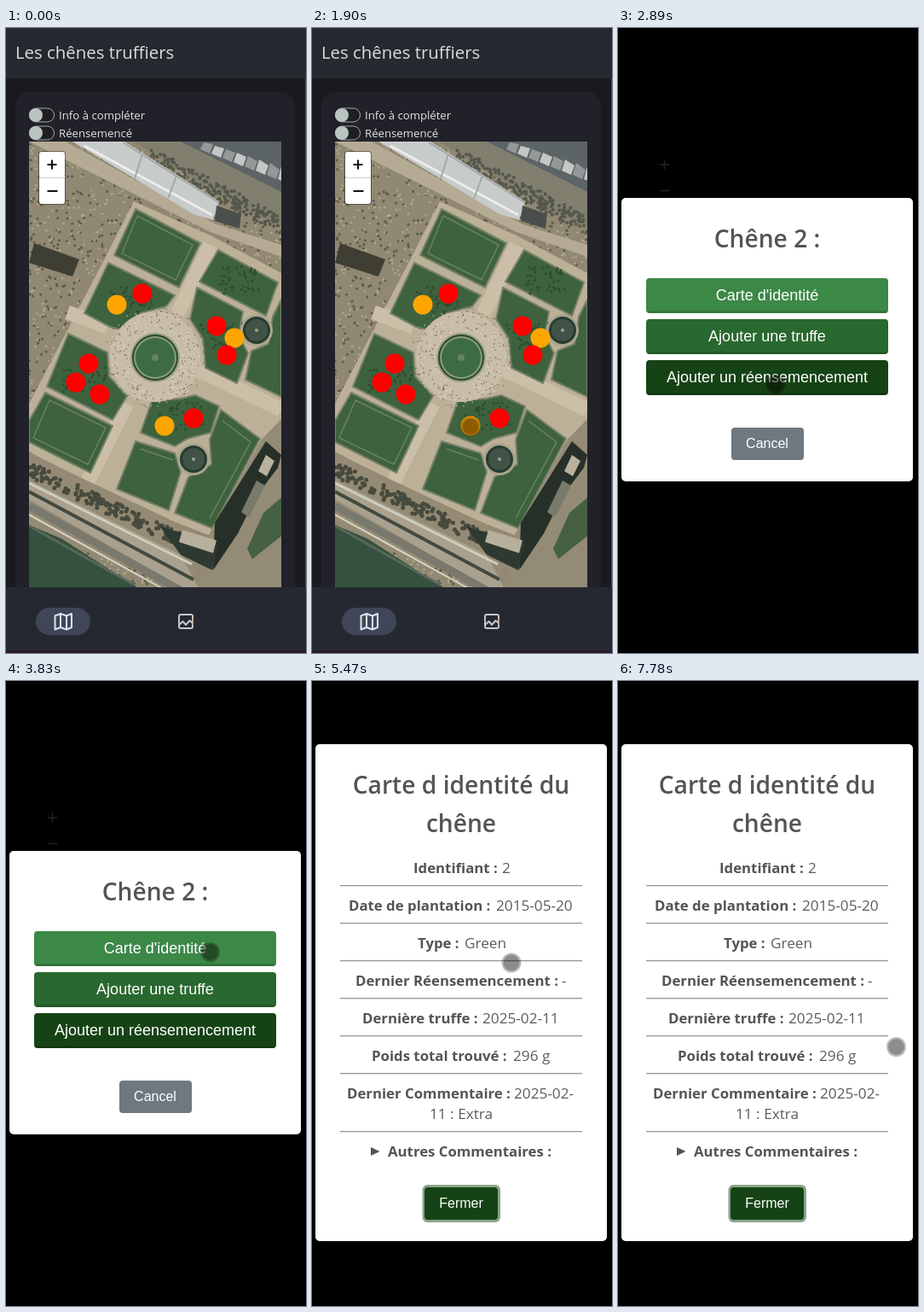
Animation of 352 by 732 pixels, one loop 8 s. Source, as an HTML page:

```html
<!DOCTYPE html>
<html lang="fr">
<head>
<meta charset="utf-8">
<title>Les chênes truffiers</title>
<style>
  html, body { margin: 0; width: 100%; height: 100%; overflow: hidden; background: #1a1a1e; }
  svg { display: block; width: 100vw; height: 100vh; }
  text { font-family: "Open Sans", "Noto Sans", sans-serif; }
  .label { font-size: 13.2px; fill: #e6e4e2; }
  .title { font-size: 28.2px; font-weight: 600; fill: #545454; text-anchor: middle; }
  .button { font: 18px "Liberation Sans", Arial, sans-serif; fill: #fff; text-anchor: middle; }
  .small { font-size: 16px; }
  .key { font-size: 16.8px; font-weight: 700; fill: #545454; }
  .value { font-size: 17.2px; fill: #5c5c5c; }
</style>
</head>
<body>
<svg viewBox="0 0 352 732">
  <defs>
    <clipPath id="mapClip"><rect x="27" y="133" width="296" height="522"/></clipPath>
    <filter id="soften"><feGaussianBlur stdDeviation=".5"/></filter>
  </defs>

  <rect width="352" height="732" fill="#1a1a1e"/>
  <rect width="352" height="59" fill="#272931"/>
  <text x="11" y="36" font-size="20.4" fill="#dadfdc">Les chênes truffiers</text>
  <rect x="11" y="75" width="328" height="620" rx="16" fill="#212129"/>
  <rect x="351" y="59" width="1" height="596" fill="#4a4c52"/>
  <g id="toggles"></g>

  <g clip-path="url(#mapClip)"><g id="map" filter="url(#soften)"></g></g>
  <g id="markers"></g>

  <rect x="38" y="144" width="32" height="63" rx="4" fill="#0006"/>
  <rect x="39" y="145" width="30" height="61" rx="3" fill="#fff"/>
  <path d="M39 175.5H69" stroke="#ccc"/>
  <path d="M48.5 160h11M54 154.5v11M48.5 191h12" stroke="#111" stroke-width="2"/>

  <rect y="655" width="352" height="77" fill="#262831"/>
  <rect y="729" width="352" height="3" fill="#2a1a2d"/>
  <rect x="35" y="679" width="64" height="32" rx="16" fill="#3f4658"/>
  <g fill="none" stroke-width="2" stroke-linejoin="round">
    <path d="M57.5 688.5L64 686 71 688.5 77 686V702L71 704.5 64 702 57.5 704.5ZM64 686V702M71 688.5V704.5" stroke="#dde1ee"/>
    <rect x="203" y="687" width="16" height="16" rx="2" stroke="#c3c8cc"/>
    <path d="M203 699L207.5 695 211 699 215.5 694 219 697" stroke="#c3c8cc"/>
    <path d="M219.5 692V700" stroke="#d08a50" stroke-width="1"/>
  </g>

  <rect id="backdrop" width="352" height="732"/>
  <path id="ghost" d="M49 160H60M54.5 154.5V165.5M50 190.5H60" stroke="#242424" stroke-width="1.5"/>

  <g id="menu">
    <rect x="4" y="199" width="342" height="332" rx="5" fill="#fff"/>
    <text class="title" x="175" y="257">Chêne 2 :</text>
    <g id="choices"></g>
    <rect x="133" y="468" width="85" height="38" rx="4" fill="#6e7881"/>
    <text class="button small" x="175" y="492">Cancel</text>
  </g>

  <g id="details">
    <rect x="4" y="74" width="342" height="582" rx="5" fill="#fff"/>
    <text class="title" x="175" y="132">Carte d identité du</text>
    <text class="title" x="175" y="177">chêne</text>
    <g id="rows"></g>
    <text class="value" x="175" y="513" text-anchor="middle">11 : Extra</text>
    <path d="M69 546L79.5 551 69 556Z" fill="#545454"/>
    <text class="key" x="89" y="557">Autres Commentaires :</text>
    <rect x="129.500" y="590" width="91.500" height="44" rx="6" fill="#8ba48a"/>
    <rect x="132" y="593" width="86" height="38" rx="4" fill="#164315"/>
    <text class="button small" x="175" y="617">Fermer</text>
  </g>

  <g id="touch" fill="#000">
    <circle r="11.500" fill-opacity=".26"/>
    <circle r="9.500" fill-opacity=".25"/>
  </g>
  <path id="arrow" d="M0 0V16.500L3.800 13 6.400 19 9 18 6.400 12H11.500Z" fill="#fff" stroke="#111"/>
</svg>

<script>
const LOOP = 8000;
const byId = id => document.getElementById(id);
const add = (id, markup) => byId(id).insertAdjacentHTML('beforeend', markup);

// --- static interface ---
[[102, 'Info à compléter'], [123, 'Réensemencé']].forEach(([y, label]) => add('toggles',
  `<rect x="27.5" y="${y - 8}" width="29" height="16" rx="8" fill="#1d1f24" stroke="#a4adaa"/>
   <circle cx="35" cy="${y}" r="8" fill="#b9c3bf"/>
   <text class="label" x="62" y="${y + 5}">${label}</text>`));

[['Carte d\'identité', '#3c8847'], ['Ajouter une truffe', '#29682e'], ['Ajouter un réensemencement', '#164315']]
  .forEach(([label, color], i) => {
    const y = 293 + 48 * i;
    add('choices',
      `<rect x="33" y="${y}" width="284" height="41" rx="4" fill="${color}"/>
       <path d="M35 ${y + 39.5}H315" stroke="#000" stroke-opacity=".15" stroke-width="3"/>
       <text class="button" x="175" y="${y + 26}">${label}</text>`);
  });

[
  [119, 'Identifiant :', 223, '2'],
  [43, 'Date de plantation :', 216, '2015-05-20'],
  [124, 'Type :', 179, 'Green'],
  [51, 'Dernier Réensemencement :', 293, '-'],
  [59, 'Dernière truffe :', 200, '2025-02-11'],
  [70, 'Poids total trouvé :', 236, '296 g'],
  [41, 'Dernier Commentaire :', 237, '2025-02-']
].forEach(([keyX, key, valueX, value], i) => {
  const y = 225 + 44 * i, lineY = i < 6 ? y + 14.5 : 527.5;
  add('rows',
    `<text class="key" x="${keyX}" y="${y}">${key}</text>
     <text class="value" x="${valueX}" y="${y}">${value}</text>
     <path d="M33 ${lineY}H317" stroke="#979797"/>
     <path d="M33 ${lineY + 1}H317" stroke="#dedede"/>`);
});

// --- aerial view ---
let seed = 7;
const random = () => (seed = seed * 16807 % 2147483647) / 2147483647;
const area = (color, points, extra = '') => add('map', `<polygon points="${points}" fill="${color}" ${extra}/>`);
const disc = (color, x, y, r) => add('map', `<circle cx="${x}" cy="${y}" r="${r}" fill="${color}"/>`);
const line = (color, width, d) => add('map', `<path d="${d}" fill="none" stroke="${color}" stroke-width="${width}"/>`);
const specks = (color, size, count, place) => {
  let d = '';
  for (let i = 0; i < count; i++) d += `M${place().map(v => v.toFixed(1)).join(' ')}h.1`;
  add('map', `<path d="${d}" stroke="${color}" stroke-width="${size}" stroke-linecap="round"/>`);
};
const anywhere = () => [27 + random() * 296, 133 + random() * 522];
const around = (x, y, near, far) => () => {
  const angle = random() * 2 * Math.PI, r = near + random() * (far - near);
  return [x + r * Math.cos(angle), y + r * Math.sin(angle)];
};

area('#908872', '27,133 323,133 323,655 27,655');
specks('#5d5b47', 3, 1300, anywhere);
specks('#b2a78e', 2.5, 1300, anywhere);

// avenue, long roofs and buildings along the top
area('#81806f', '150,133 323,133 323,232 275,212');
specks('#55584b', 4, 200, () => { const x = 170 + random() * 150; return [x, 140 + (x - 170) * .52 + random() * 22]; });
area('#b5ab95', '27,133 70,133 245,229 323,254 323,268 240,239');
area('#c7cbca', '78,133 139,133 250,203 243,225 220,218');
line('#eceeeb', 3, 'M92 138L242 219');
line('#a2a8a7', 2, 'M137 134L249 204M160 148L151 176M200 173L190 200');
area('#4b4f4b', '247,208 276,218 274,235 245,226');
area('#5c6466', '205,133 323,133 323,192');
for (let i = 0; i < 8; i++) area(i % 2 ? '#c3c7c5' : '#929998', `${232 + i * 13},${134 + i * 4} ${243 + i * 13},${136 + i * 5} ${239 + i * 13},${147 + i * 5} ${228 + i * 13},${142 + i * 5}`);
area('#3e3e33', '33,252 86,271 78,291 27,275');

// garden ground and lawns
area('#bcb097', '150,203 240,243 323,287 323,460 300,482 238,594 130,552 27,496 27,440 118,266');
line('#cbbfa8', 17, 'M240 254L201 335M142 440L94 535M225 400L323 447M119 350L72 333');
const lawn = points => area('#3d623d', points, 'stroke="#77816a" stroke-width="2"');
lawn('152,212 228,252 203,304 127,266');
lawn('120,275 198,313 188,326 158,334 138,354 122,350 92,334');
lawn('249,260 319,298 305,337 227,297');
lawn('224,304 278,332 273,360 284,381 271,416 234,398 231,364 216,341');
lawn('313,338 323,318 323,432 281,412 288,378 308,370');
lawn('73,358 119,380 121,408 142,431 125,459 48,420');
lawn('46,427 125,466 99,521 27,485 27,460');
lawn('171,437 205,434 222,430 250,443 240,474 213,481 198,490 158,474');
lawn('152,484 198,498 205,520 191,565 130,540');
lawn('252,447 298,481 242,586 198,568 214,526 241,511 239,482');
specks('#2d4c31', 3, 210, () => {
  const beds = [[145, 318], [253, 360], [93, 410], [206, 455], [275, 295]];
  const [x, y] = beds[Math.floor(random() * beds.length)];
  return [x + (random() - .5) * 52, y + (random() - .5) * 32];
});
line('#6b8060', 1.5, 'M154 220L219 254 199 295 136 264ZM51 436L117 468 96 511 32 480ZM158 493L196 506M254 460L287 485 239 574');

// central plaza and ponds
disc('#c8bda8', 175, 385, 53);
specks('#665f50', 1.3, 190, around(175, 385, 32, 62));
specks('#e6ddca', 1.3, 160, around(175, 385, 30, 58));
[['#9aa083', 29], ['#28472f', 27], ['#8d9c7c', 25], ['#3d6c43', 23], ['#67855d', 4]]
  .forEach(([color, r]) => disc(color, 175, 386, r));
[[294, 354], [220, 505]].forEach(([x, y]) => {
  disc('#aaa58c', x, y, 19);
  disc('#263c30', x, y, 16);
  disc('#405346', x, y, 13);
  disc('#9aa390', x, y, 2);
});

// terrace, quay and river along the bottom
area('#958b75', '27,497 95,530 240,598 215,655 27,590');
specks('#474b3d', 5, 150, () => { const x = 27 + random() * 180; return [x, 508 + (x - 27) * .47 + random() * 18]; });
area('#a9a18e', '27,530 205,617 225,655 205,655 27,552');
line('#d0cdbd', 3, 'M27 533L218 628');
line('#424940', 4, 'M27 543L220 646');
line('#79796d', 9, 'M27 560L220 667');
line('#d6d2c1', 2, 'M27 570L190 660');
area('#35513f', '27,582 65,598 154,655 27,655');
line('#586859', 3, 'M27 583L150 652');
area('#948b77', '300,482 323,458 323,655 225,655 240,590');
area('#263029', '305,484 323,500 319,515 294,548 272,592 243,635 245,579');
area('#b9b19c', '305,500 315,507 306,525 296,519');
area('#787a6b', '294,530 304,536 285,573 276,567');
area('#2e3931', '180,583 208,592 249,604 242,635 205,617');
area('#b6af9c', '207,588 247,600 243,615 203,602');
area('#456043', '302,568 323,550 323,595 289,622 283,610');

const RED = '#f00', ORANGE = '#ffa500';
[[RED, 160, 311], [ORANGE, 130, 324], [RED, 247, 349], [ORANGE, 268, 363], [RED, 259, 383],
 [RED, 97, 393], [RED, 82, 415], [RED, 110, 429], [RED, 220, 457], [ORANGE, 186, 466]]
  .forEach(([color, x, y]) => add('markers', `<circle cx="${x}" cy="${y}" r="11.5" fill="${color}"/>`));

// --- animation ---
const between = (t, from, to) => t >= from && t < to;
const show = (id, visible) => byId(id).setAttribute('display', visible ? 'inline' : 'none');

// CSS "ease" timing, cubic-bezier(.25, .1, .25, 1)
function ease(x) {
  const curve = (s, a, b) => 3 * (1 - s) ** 2 * s * a + 3 * (1 - s) * s * s * b + s ** 3;
  let low = 0, high = 1;
  for (let i = 0; i < 20; i++) {
    const mid = (low + high) / 2;
    if (curve(mid, .25, .25) < x) low = mid; else high = mid;
  }
  return curve(low, .1, 1);
}

const POP = [[0, .7], [.45, 1.05], [.8, .95], [1, 1]];
function popScale(elapsed) {
  const p = Math.min(1, Math.max(0, elapsed / 300));
  const i = p < .45 ? 0 : p < .8 ? 1 : 2;
  const [[t0, a], [t1, b]] = [POP[i], POP[i + 1]];
  return a + (b - a) * ease((p - t0) / (t1 - t0));
}
const zoom = (id, scale) =>
  byId(id).setAttribute('transform', `translate(175 365) scale(${scale}) translate(-175 -365)`);

// pointer stops: time, x, y
const STOPS = [
  [500, 324.5, 416.5], [1270, 187.5, 466.5], [1350, 186, 467],
  [2730, 186, 467], [3150, 182.5, 315.5], [3290, 182.5, 314],
  [3480, 182.5, 314], [3830, 239.5, 317.5], [4740, 239.5, 317.5],
  [4790, 236.5, 321.5], [5060, 236.5, 321.5], [5110, 236.5, 333.5],
  [5420, 236.5, 333.5], [5470, 234, 330], [6110, 223, 384.5],
  [6260, 223, 384.5], [7060, 316.5, 393.5], [7780, 326.5, 428.5]
];
function pointerAt(t) {
  const i = STOPS.findIndex(stop => stop[0] > t);
  if (i < 1) return (i ? STOPS[STOPS.length - 1] : STOPS[0]).slice(1);
  const [t0, x0, y0] = STOPS[i - 1], [t1, x1, y1] = STOPS[i];
  const p = (t - t0) / (t1 - t0), k = p * p * (3 - 2 * p);
  return [x0 + (x1 - x0) * k, y0 + (y1 - y0) * k];
}

function draw(t) {
  show('backdrop', t >= 2010);
  byId('backdrop').setAttribute('opacity', Math.min(1, Math.max(0, (t - 1996) / 100)));
  show('ghost', between(t, 2100, 4240));
  show('menu', between(t, 2010, 4470));
  show('details', t >= 4470);
  zoom('menu', popScale(t - 1996));
  zoom('details', popScale(t - 4382));

  const [x, y] = pointerAt(t);
  const arrow = between(t, 2060, 2770) || between(t, 4470, 4790);
  const pressed = between(t, 1760, 1900) || between(t, 4150, 4330);
  show('arrow', arrow);
  show('touch', t >= 500 && !arrow);
  byId('arrow').setAttribute('transform', `translate(${x} ${y})`);
  byId('touch').setAttribute('transform', `translate(${x} ${y}) scale(${pressed ? 1.28 : 1})`);
}

const start = performance.now();
function tick() {
  draw((performance.now() - start) % LOOP);
  requestAnimationFrame(tick);
}
tick();
</script>
</body>
</html>
```
